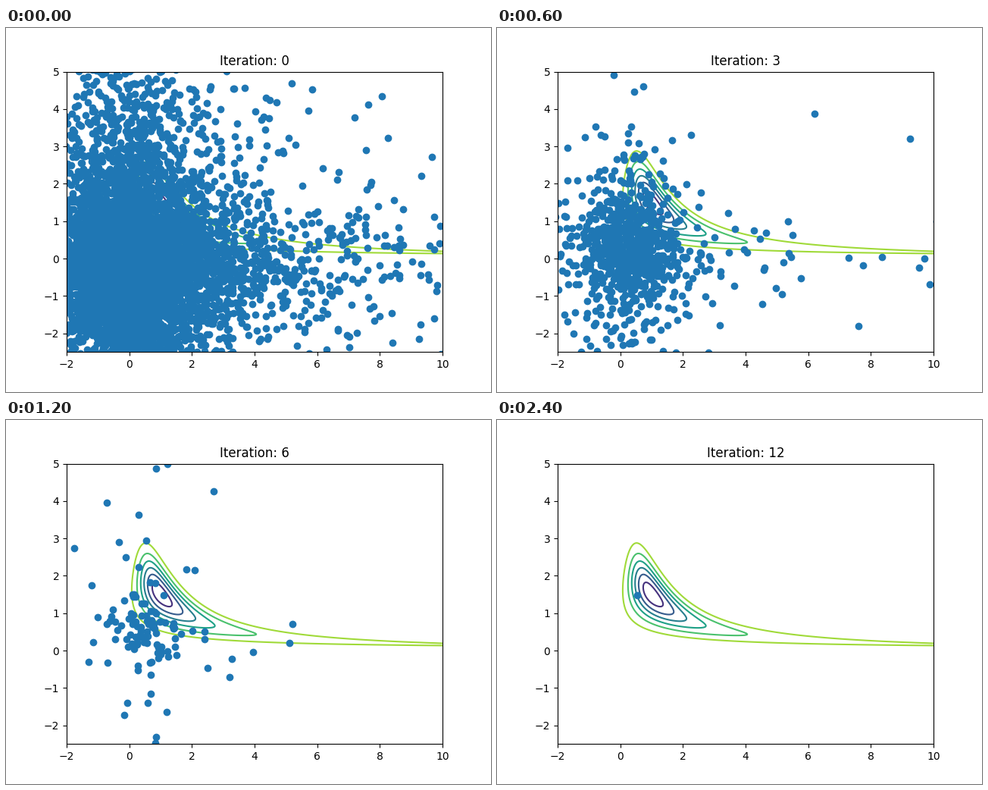
A matplotlib script for the animation above (2.6 s loop, 640 by 480 pixels).

```python
import numpy as np
import matplotlib.pyplot as plt
from matplotlib.animation import FuncAnimation

ITERATIONS = 13
START_SIZE = 8191  # halves down to a single point
TAIL_DOF = 1.4
BEST = (0.53, 1.48)

plt.rcParams["text.kerning_factor"] = 6  # whole-pixel kerning


def population(step):
    """Heavy-tailed cloud that halves, tightens and drifts to the optimum."""
    rng = np.random.default_rng(40 + step)
    center = np.array([0.02 + 0.09 * step, -0.15 + 0.1 * step])
    spread = 0.55 + 0.6 * 0.65 ** step
    noise = rng.standard_t(TAIL_DOF, (START_SIZE >> step, 2))
    points = center + spread * noise
    if step > 8:
        points[0] = BEST
    return points


def objective(x, y):
    return -np.exp(-(x * y - 1.5) ** 2 - (y - 1.5) ** 2)


fig, ax = plt.subplots(figsize=(6.4, 4.8), dpi=100)
grid_x, grid_y = np.meshgrid(np.linspace(-2, 10, 601),
                             np.linspace(-2.5, 5, 501))
ax.contour(grid_x, grid_y, objective(grid_x, grid_y),
           levels=np.arange(-7, 1) * 0.15, cmap="viridis", zorder=2)
dots, = ax.plot([], [], "o", color="tab:blue", zorder=2.2)
ax.set_xlim(-2, 10)
ax.set_ylim(-2.5, 5)
title = ax.set_title("Iteration: 0")


def update(step):
    dots.set_data(*population(step).T)
    title.set_text(f"Iteration: {step}")
    return dots, title


anim = FuncAnimation(fig, update, frames=ITERATIONS, interval=200,
                     repeat=True, repeat_delay=0)
plt.show()
```
